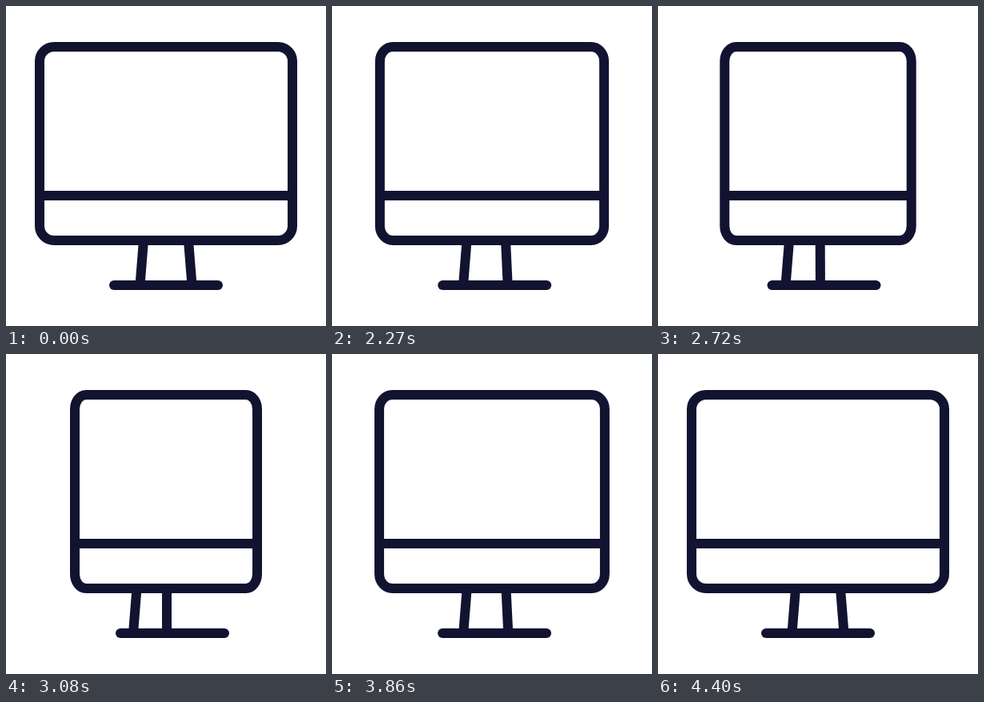
These frames come from a looping animation (400 by 400 pixels, 4.43 s). An HTML page with a canvas:

```html
<!DOCTYPE html>
<html lang="en">
<head>
<meta charset="utf-8">
<title>Turning monitor</title>
<style>
  html, body { margin: 0; width: 100%; height: 100%; overflow: hidden; background: #fff; }
  canvas { display: block; width: 400px; height: 400px; }
</style>
</head>
<body>
<canvas id="stage" width="400" height="400"></canvas>
<script>
const ctx = document.getElementById('stage').getContext('2d');
const LOOP = 4430, TURN = 2030, BACK = 3100, STEP = 30;

// Ease curve with handles (a, 0) and (b, 1), solved by bisection.
function ease(x, a, b) {
  if (x <= 0) return 0;
  if (x >= 1) return 1;
  let lo = 0, hi = 1;
  for (let i = 0; i < 30; i++) {
    const s = (lo + hi) / 2, r = 1 - s;
    if (3 * r * r * s * a + 3 * r * s * s * b + s * s * s < x) lo = s;
    else hi = s;
  }
  return lo * lo * (3 - 2 * lo);
}

// 0 faces the viewer, 1 is turned aside.
function turnAt(t) {
  if (t < TURN) return 0;
  t = TURN + Math.floor((t - TURN) / STEP) * STEP;
  return t < BACK
    ? ease((t - TURN) / (BACK - TURN), 0.3, 0.05)
    : 1 - ease((t - BACK) / (LOOP - BACK), 0.75, 0.35);
}

function line(x1, y1, x2, y2, cap = 'butt') {
  ctx.lineCap = cap;
  ctx.beginPath();
  ctx.moveTo(x1, y1);
  ctx.lineTo(x2, y2);
  ctx.stroke();
}

function frame(left, top, right, bottom, rx, ry) {
  const q = Math.PI / 2;
  const corner = (x, y, turn) =>
    ctx.ellipse(x, y, rx, ry, 0, turn * q, (turn + 1) * q);
  ctx.beginPath();
  corner(right - rx, bottom - ry, 0);
  corner(left + rx, bottom - ry, 1);
  corner(left + rx, top + ry, 2);
  corner(right - rx, top + ry, 3);
  ctx.closePath();
  ctx.stroke();
}

function draw(t) {
  const p = turnAt(t);
  const mix = (from, to) => from + (to - from) * p;
  ctx.fillStyle = '#fff';
  ctx.fillRect(0, 0, 400, 400);
  ctx.strokeStyle = '#121331';
  ctx.lineWidth = 12;

  const half = mix(158, 114);
  frame(200 - half, 51, 200 + half, 293, mix(18, 14), 18);
  line(200 - half, 237, 200 + half, 237);
  line(mix(172, 163.5), 293, mix(167.5, 159), 349);
  line(mix(228, 201), 293, mix(232.5, 201), 349);
  line(mix(135, 143), 349, mix(265, 273), 349, 'round');
}

function tick() {
  draw(performance.now() % LOOP);
  requestAnimationFrame(tick);
}
tick();
</script>
</body>
</html>
```
